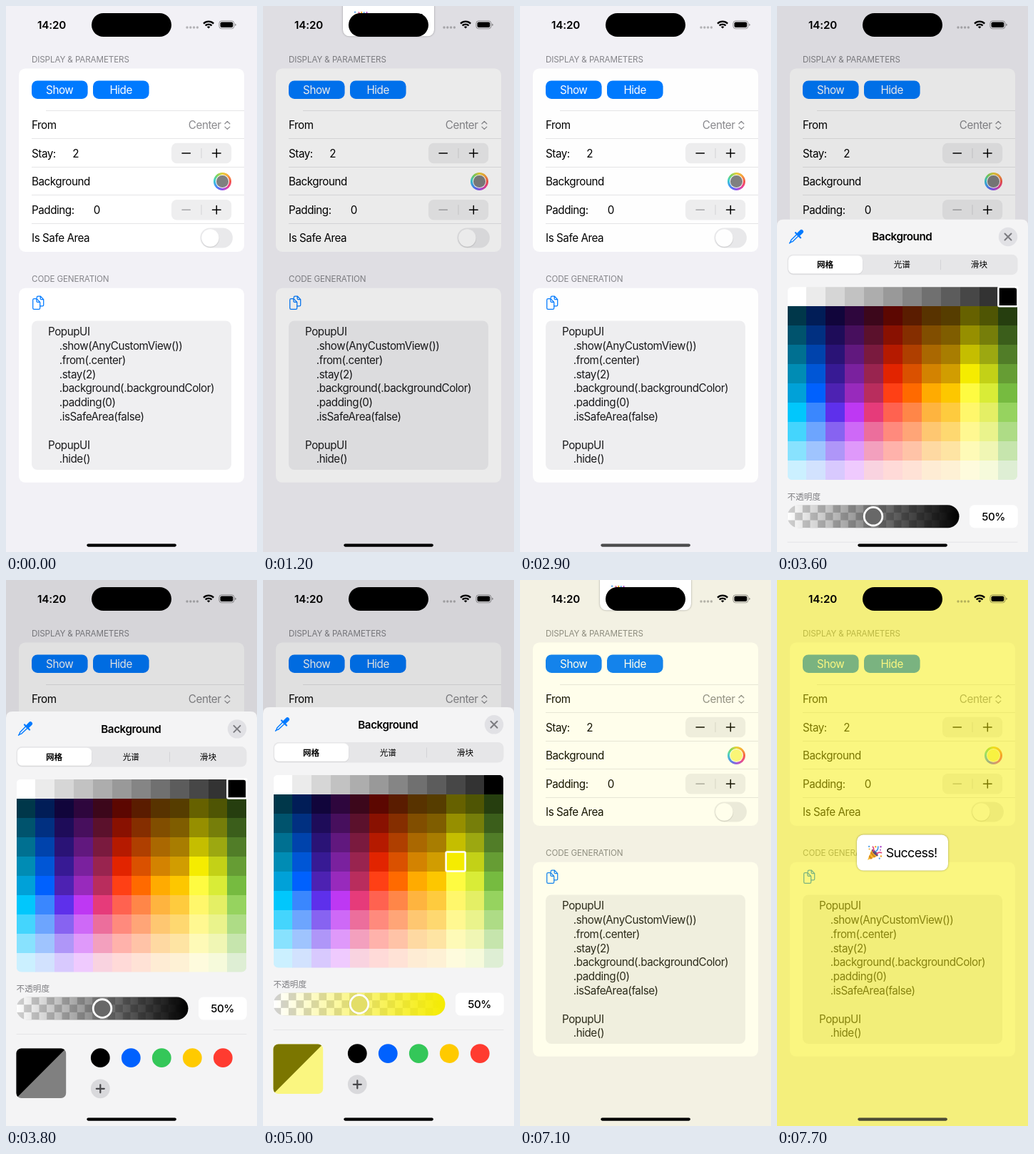
Recreate the animation shown at these times as an HTML page. Size 352 px wide and 764 px high, loop 8000 ms.

```html
<!DOCTYPE html>
<html lang="en">
<head>
<meta charset="utf-8">
<title>Popup demo</title>
<style>
html, body { margin: 0; width: 100%; height: 100%; overflow: hidden; background: #f2f1f6; }
#stage {
  --c: #000;
  --half: color-mix(in srgb, var(--c) 50%, #fff);
  position: relative; width: 352px; height: 764px; overflow: hidden;
  font-family: Inter, "Noto Sans CJK SC", "Noto Sans CJK", sans-serif;
}
#stage > * { position: absolute; left: 0; top: 0; }
svg { display: block; width: 352px; height: 764px; }
text { font-size: 15.2px; letter-spacing: -.029em; white-space: pre; }
.head { font-size: 11.64px; letter-spacing: -.01em; fill: #85858a; }
.mid { text-anchor: middle; }
.end { text-anchor: end; }
.semi { font-weight: 600; }
.cjk { font-size: 11.64px; letter-spacing: 0; font-family: "Noto Sans CJK SC", "Noto Sans CJK", sans-serif; }
.line { stroke: #e5e5e7; }
.icon { fill: none; stroke-linecap: round; stroke-linejoin: round; }
#stage > .ring {
  left: 291px; top: 233px; width: 25px; height: 25px; border-radius: 50%;
  background: conic-gradient(#e8d03a, #f7a53a 12%, #f4554a 25%, #ec3f8f 36%, #a14fe6 48%, #5a6cf5 58%, #3ea4f0 68%, #3fd0c8 78%, #7ad560 88%, #e8d03a);
}
.ring::before, .ring::after { content: ""; position: absolute; border-radius: 50%; }
.ring::before { inset: 2.6px; background: #fff; }
.ring::after { inset: 4.2px; background: var(--half); }
#tint, #dim { width: 352px; height: 764px; opacity: 0; }
#tint { background: var(--c); }
#dim { background: #000; }
#stage > #popup {
  left: 112.3px; top: 357px; width: 127.4px; height: 50.4px; border-radius: 9px;
  background: #fff; box-shadow: 0 0 2.5px rgba(0, 0, 0, .38);
}
#popup svg { width: 127px; height: 50px; }
#popup text { font-size: 17.9px; letter-spacing: -.035em; }
</style>
</head>
<body>
<div id="stage">
  <svg id="page" viewBox="0 0 352 764">
    <rect width="352" height="764" fill="#f2f1f6"/>
    <text class="head" x="36" y="79.3">DISPLAY &amp; PARAMETERS</text>
    <text class="head" x="36" y="386.3">CODE GENERATION</text>
    <g fill="#fff">
      <rect x="18" y="87.5" width="316" height="256.5" rx="9"/>
      <rect x="18" y="394.8" width="316" height="272" rx="9"/>
    </g>
    <g fill="#007aff">
      <rect x="36" y="104.5" width="78.6" height="25.4" rx="8"/>
      <rect x="122" y="104.5" width="78.6" height="25.4" rx="8"/>
    </g>
    <g class="mid" fill="#fff">
      <text x="75.2" y="122.8">Show</text>
      <text x="161.2" y="122.8">Hide</text>
    </g>
    <path class="line" d="M56 146.5H334M36 185.5H334M36 225.5H334M36 264.5H334M36 304.5H334"/>
    <g id="rows">
      <text x="36" y="172.3">From</text>
      <text class="end" x="301.5" y="172.3" fill="#8a8a8e">Center</text>
      <text x="36" y="211.7">Stay:</text>
      <text x="93.3" y="211.7">2</text>
      <text x="36" y="251.1">Background</text>
      <text x="36" y="290.5">Padding:</text>
      <text x="122.8" y="290.5">0</text>
      <text x="36" y="329.9">Is Safe Area</text>
    </g>
    <path class="icon" stroke="#8a8a8e" stroke-width="1.3" d="M307 164.7l3.4-3.3 3.4 3.3M307 169.1l3.4 3.3 3.4-3.3"/>
    <g id="steppers"></g>
    <rect x="272.3" y="310.5" width="45.6" height="28" rx="14" fill="#e9e9eb"/>
    <circle cx="286.6" cy="325.6" r="12.6" fill="#000" opacity=".09"/>
    <circle cx="286.4" cy="324.5" r="12.2" fill="#fff"/>
    <g class="icon" stroke="#007aff" stroke-width="1.25">
      <path d="M43.3 408.5v-1q0-1.5 1.5-1.5h3.4l4.5 4.6v7.6q0 1.6-1.6 1.6h-3.4M48.2 406v3.4q0 1.2 1.2 1.2h3.3"/>
      <path d="M39.4 409.6h3.6l4.7 4.8v8.3q0 1.7-1.7 1.7h-6.6q-1.7 0-1.7-1.7v-11.4q0-1.7 1.7-1.7zM42.9 409.6v3.5q0 1.3 1.3 1.3h3.5"/>
    </g>
    <rect x="36" y="440.5" width="280" height="208.5" rx="8" fill="#efeff1"/>
    <g id="code" fill="#1a1a1c"></g>
  </svg>
  <div class="ring"></div>
  <div id="tint"></div>
  <div id="dim"></div>
  <div id="popup">
    <svg viewBox="112.5 357 127 50">
      <path d="M127.6 392.3l5.8-14.6q5.8 2.6 8.6 8.8z" fill="#f7b92f"/>
      <path d="M130.4 385.3l4 5-2.4.9-2.9-3.2zM132.4 380.2l6.6 7.9-2.3.9-5.4-6.1z" fill="#d98a1c"/>
      <ellipse cx="137.8" cy="382" rx="2.1" ry="6" transform="rotate(-43 137.8 382)" fill="#5a4a78"/>
      <g class="icon" stroke-width="1.7">
        <path d="M135.5 380q1.6-3-.6-6.4" stroke="#e0457b"/>
        <path d="M138.5 380.3q4-1.4 3.8-6.8" stroke="#4a9be8"/>
        <path d="M140.4 383.5q2.6-2.8 6.6-1.4" stroke="#e0457b"/>
      </g>
      <g fill="#f2a72e"><circle cx="138.7" cy="373.7" r="1.2"/><circle cx="146.4" cy="387" r="1.2"/><circle cx="130" cy="377" r="1"/></g>
      <g fill="#4a9be8"><circle cx="129.6" cy="373.4" r="1.1"/><circle cx="144.2" cy="390.2" r="1.1"/></g>
      <g fill="#b04fc8"><circle cx="146" cy="373.8" r="1.2"/><circle cx="145.5" cy="378.3" r="1"/></g>
      <text x="153.2" y="388.6">Success!</text>
    </svg>
  </div>
  <svg id="sheet" viewBox="0 0 352 764">
    <defs>
      <clipPath id="gridClip"><rect x="14.5" y="272.5" width="322.8" height="270" rx="7"/></clipPath>
      <clipPath id="previewClip"><rect x="14.5" y="649.5" width="69.7" height="69.5" rx="7"/></clipPath>
      <pattern id="checker" x="14.5" y="577.5" width="21.33" height="21.33" patternUnits="userSpaceOnUse">
        <rect width="21.4" height="21.4" fill="#fff"/>
        <path d="M0 0h10.67v21.33h10.66v-10.66H0z" fill="#d0d0d0"/>
      </pattern>
      <linearGradient id="alpha">
        <stop offset="0" style="stop-color: var(--c)" stop-opacity="0"/>
        <stop offset="1" style="stop-color: var(--c)"/>
      </linearGradient>
    </defs>
    <path d="M0 764V187q0-9 9-9H343q9 0 9 9V764z" fill="#f4f4f5"/>
    <g class="icon" stroke="#007aff">
      <path d="M30.6 198.6l3.6-3.6" stroke-width="5.6"/>
      <path d="M26 196.5l7 7" stroke-width="2.3"/>
      <path d="M27.3 199.3l-7.6 7.6-.8 2.4-1.4 1.9 1.9-1.4 2.4-.8 8-7.6" stroke-width="1.4"/>
    </g>
    <text class="mid semi" x="175.3" y="207.5">Background</text>
    <circle cx="324" cy="202.3" r="13.2" fill="#e1e1e5"/>
    <path class="icon" stroke="#7b7b80" stroke-width="2" d="M319.5 197.8l9 9m0-9l-9 9"/>
    <rect x="14.5" y="227" width="323" height="28.5" rx="8" fill="#e6e6e8"/>
    <rect x="16" y="229.5" width="104.3" height="25.3" rx="6.5" fill="#000" opacity=".08"/>
    <rect x="16" y="228.6" width="104" height="25.2" rx="6.5" fill="#fff"/>
    <path d="M229.5 234.5v14" stroke="#d3d3d6"/>
    <g class="mid">
      <text class="cjk" x="67.6" y="245.7" font-weight="700">网格</text>
      <text class="cjk" x="175.3" y="245.7" font-weight="500">光谱</text>
      <text class="cjk" x="283.5" y="245.7" font-weight="500">滑块</text>
    </g>
    <g id="grid" clip-path="url(#gridClip)" shape-rendering="crispEdges"></g>
    <rect id="pick" width="27" height="27" rx="1.5" fill="none" stroke="#fff" stroke-width="2.5"/>
    <text class="cjk" x="14.5" y="569.8" font-weight="500" fill="#7d7d81">不透明度</text>
    <rect x="14.5" y="577.5" width="241" height="32" rx="16" fill="url(#checker)"/>
    <rect x="14.5" y="577.5" width="241" height="32" rx="16" fill="url(#alpha)"/>
    <circle cx="135" cy="593.5" r="14.8" fill="#000" opacity=".08"/>
    <circle cx="135" cy="593.5" r="12.8" style="fill: color-mix(in srgb, var(--c) 50%, #d0d0d0)" stroke="#fff" stroke-width="2.8"/>
    <rect x="270" y="577.5" width="67.7" height="32" rx="7" fill="#fff"/>
    <text class="mid" x="303.6" y="599" font-weight="500">50%</text>
    <path class="line" d="M14.5 629.5H337.5"/>
    <g clip-path="url(#previewClip)">
      <rect x="14" y="649" width="71" height="71" style="fill: var(--half)"/>
      <path d="M14 649H84.5L14 719.5z" style="fill: color-mix(in srgb, var(--c) 50%, #000)"/>
    </g>
    <g id="swatches"></g>
    <circle cx="132.3" cy="705.8" r="13.4" fill="#d9d9dc"/>
    <path class="icon" stroke="#48484b" stroke-width="2.2" d="M126.8 705.8h11m-5.5-5.5v11"/>
  </svg>
  <svg viewBox="0 0 352 764">
    <text class="semi" x="44" y="32" style="letter-spacing: -.01em">14:20</text>
    <rect x="120" y="10" width="112" height="33" rx="16.5"/>
    <g opacity=".26">
      <circle cx="254" cy="30" r="1.7"/><circle cx="258.8" cy="30" r="1.7"/>
      <circle cx="263.6" cy="30" r="1.7"/><circle cx="268.4" cy="30" r="1.7"/>
    </g>
    <g fill="none" stroke="#000" stroke-width="2.3">
      <path d="M277 24.6a10.2 10.2 0 0 1 14.2 0M279.6 27.4a6.4 6.4 0 0 1 9 0"/>
      <path d="M281.9 29.2a3.2 3.2 0 0 1 4.4 0l-2.2 2.4z" fill="#000" stroke="none"/>
    </g>
    <rect x="298.9" y="20.9" width="21" height="10.8" rx="3.4" fill="none" stroke="#000" stroke-opacity=".38"/>
    <rect x="300.5" y="22.5" width="17.8" height="7.6" rx="2"/>
    <path d="M321.2 24.5q1.5.5 1.5 1.8t-1.5 1.8z" opacity=".42"/>
    <rect id="bar" x="113.3" y="752.4" width="125.6" height="4.3" rx="2.15"/>
  </svg>
</div>
<script>
const $ = id => document.getElementById(id);
const stage = $('stage');
const CELL = { x: 14.5, y: 272.5, w: 26.9, h: 27 };

// Form details
$('steppers').innerHTML = [[206, '#000'], [285.2, '#a5a5a8']].map(([y, minus]) => `
  <rect x="232" y="${y - 14.2}" width="84.2" height="28.4" rx="7.5" fill="#eeeeef"/>
  <path d="M274 ${y - 7}v14" stroke="#d2d2d5"/>
  <path class="icon" d="M247 ${y}h11.4" stroke="${minus}" stroke-width="1.5"/>
  <path class="icon" d="M289.5 ${y}h11.6m-5.8-5.8v11.6" stroke="#000" stroke-width="1.5"/>`).join('');

$('code').innerHTML = [
  'PopupUI', '.show(AnyCustomView())', '.from(.center)', '.stay(2)',
  '.background(.backgroundColor)', '.padding(0)', '.isSafeArea(false)',
  '', 'PopupUI', '.hide()'
].map((s, i) => `<text x="${s[0] === '.' ? 74.8 : 59}" y="${461.3 + 19.78 * i}">${s}</text>`).join('');

// Palette: a grey row, then key rows blended downwards
const KEYS = {
  1: '00374a 011d57 11053b 2e063d 3c071b 5c0701 5a1c00 583300 563d00 666100 4f5504 263e0f',
  4: '008cb4 0056d6 371a94 7a219e 99244f e22400 da5100 d38301 d19d01 f5ec00 c3d117 669d34',
  5: '00a1d8 0061fe 4d22b2 982abc b92d5d ff4015 ff6a00 ffab01 fdc700 fefb41 d9ec37 76bb40',
  6: '01c7fc 3a87fe 5e30eb be38f3 e63b7a ff6250 ff8648 feb43f fecb3e fff76b e4ef65 96d35f',
  9: 'cbf0ff d2e2fe d8c9fe efcafe f9d3e0 ffdad8 ffe2d6 feecd4 fef1d5 fefbdd f6fadb deeed4'
};
const rgb = (row, col) => KEYS[row].split(' ')[col].match(/../g).map(h => parseInt(h, 16));

function cellColor(row, col) {
  if (row === 0) {
    const v = col === 11 ? 0 : Math.round(255 - 20.4 * col);
    return `rgb(${v},${v},${v})`;
  }
  const rows = Object.keys(KEYS).map(Number);
  const hi = rows.find(r => r >= row);
  const lo = rows.filter(r => r <= row).pop();
  const k = hi === lo ? 0 : (row - lo) / (hi - lo);
  const b = rgb(hi, col);
  return `rgb(${rgb(lo, col).map((v, i) => Math.round(v + (b[i] - v) * k))})`;
}

let cells = '';
for (let r = 0; r < 10; r++) {
  for (let c = 0; c < 12; c++) {
    cells += `<rect x="${CELL.x + c * CELL.w}" y="${CELL.y + r * CELL.h}" width="27" height="27" fill="${cellColor(r, c)}"/>`;
  }
}
$('grid').innerHTML = cells;

$('swatches').innerHTML = ['#000', '#0061fe', '#34c759', '#ffca00', '#ff3b30']
  .map((f, i) => `<circle cx="${132.3 + 43 * i}" cy="662.6" r="13.4" fill="${f}"/>`).join('');

// Progress 0..1 of a critically damped spring
function spring(t, start, w) {
  const x = Math.max(0, t - start) / 1000 * w;
  return 1 - (1 + x) * Math.exp(-x);
}
const within = (t, a, b) => t >= a && t < b;

function select(row, col) {
  stage.style.setProperty('--c', cellColor(row, col));
  $('pick').setAttribute('x', CELL.x + col * CELL.w);
  $('pick').setAttribute('y', CELL.y + row * CELL.h);
}

function draw(t) {
  if (t < 4800) select(0, 11);
  else select(4, 9);

  const pop = t < 4000 ? spring(t, 1150, 14) - spring(t, 2640, 27) : spring(t, 7050, 14);
  $('popup').style.transform = `translateY(${-432 * (1 - pop)}px)`;
  $('popup').style.visibility = pop > .02 ? 'visible' : 'hidden';
  $('tint').style.opacity = pop * .5;

  const up = spring(t, 3438, 18.24) - spring(t, 6071, 18.24);
  $('sheet').style.transform = `translateY(${586 * (1 - up)}px)`;
  $('dim').style.opacity = up * .12;

  const faded = within(t, 1300, 3300) || within(t, 6100, 6600) || t >= 7200;
  $('bar').setAttribute('fill', faded ? '#222' : '#000');
  $('bar').setAttribute('opacity', faded ? .8 : 1);
}

function loop() {
  draw(Math.floor(performance.now() % 8000 / 100) * 100);
  requestAnimationFrame(loop);
}
loop();
</script>
</body>
</html>
```
